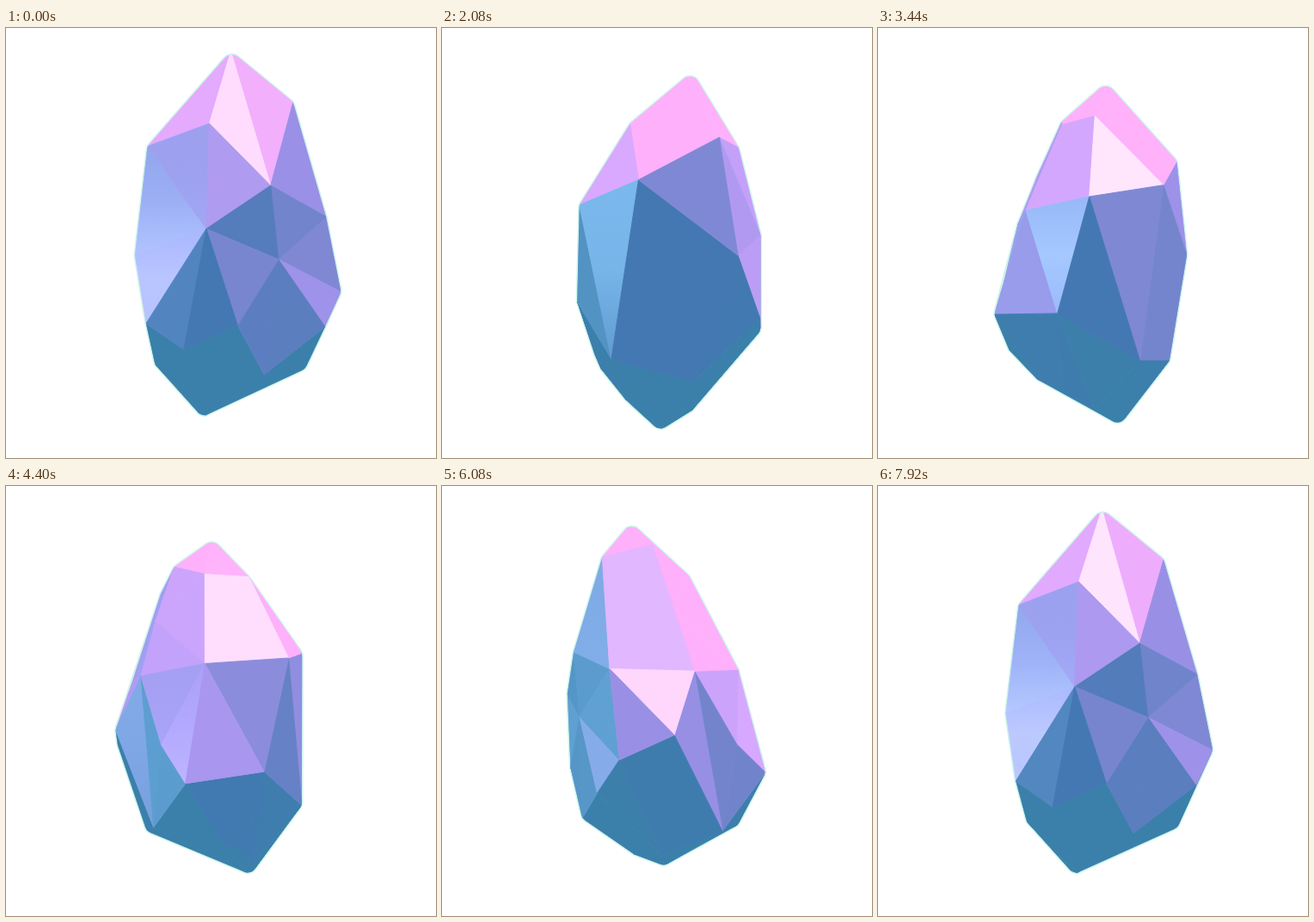
An HTML page with a canvas for the animation above (8 s loop, 500x500 px).

```html
<!DOCTYPE html>
<html lang="en">
<head>
<meta charset="utf-8">
<title>Turning crystal</title>
<style>
  html, body { margin: 0; height: 100%; overflow: hidden; background: #fff; }
  canvas { display: block; width: 100vmin; height: 100vmin; }
</style>
</head>
<body>
<canvas id="stage" width="500" height="500"></canvas>
<script>
const ctx = document.getElementById('stage').getContext('2d');
const CENTER_X = 256, CENTER_Y = 262, CAMERA = 420;
const LOOP = 8000, STEP = 80, DEG_PER_MS = 0.04525;

// Corners as x, y (down), z (towards the viewer)
const corners = {
  A: [5, -215, 36],   B: [-13, -145, -37], C: [33, -146, -26], R: [58, -166, 15],
  e: [66, -149, 64],  a: [-15.5, -120, 86], f: [-81, -110, 48.5], U: [82, -97, -3],
  v: [-84, -68, -28], b: [40, -61, 95],    t: [-32, -51, -90], D: [47, -44, -76],
  P: [99, -36, -20],  j: [101, -37, 55],   c: [-17, -21, 111], p: [-90, 2, 64],
  d: [48, 5.5, 88],   Q: [123, 19.5, 1],   J: [85, 31, -63],   k: [119, 40, 46],
  E: [-3, 55, -97],   G: [70, 61, -97],    g: [-73, 64, 91],   i: [10, 63, 103],
  l: [97, 72, 66],    h: [-37, 84, 104],   r: [-68, 102, -54], K: [90, 111, -48],
  m: [35, 112, 87],   q: [-78, 122, 24],   L: [30, 125, -81],  o: [90, 132, 8],
  M: [6, 135, -71],   O: [-15, 163, -42],  N: [-29, 192, -5],  W: [-22, 174, 32]
};

const faces = (
  'Afa Aab Abe AeR ARC ACB ABvf Bvt BCDt RUC UCD UPD ' +
  'PjeRU bej abc fac fcp fvp pcg vtr vpqr pgq tEr DtE DEG DGJ PDJ ' +
  'bcd bjd cdi djk dkl dim dml jPQ jQk PQK PJK JGK ' +
  'cgh chi ghq kQKo klo GKL GEL LEM EMO ErO ' +
  'hiW imW mWol WNo oKN KLN LMN MON OrN rqN qhW qWN'
).split(' ');

// Tint by how far a facet leans up and to the right
const ramp = [
  [-0.5, [58, 128, 170]], [-0.06, [68, 120, 178]], [0.08, [125, 135, 210]],
  [0.23, [163, 147, 237]], [0.4, [215, 168, 255]], [0.52, [255, 176, 250]]
];

const sub = (p, q) => p.map((value, n) => value - q[n]);
const dot = (p, q) => p[0] * q[0] + p[1] * q[1] + p[2] * q[2];
const cross = (p, q) => [
  p[1] * q[2] - p[2] * q[1], p[2] * q[0] - p[0] * q[2], p[0] * q[1] - p[1] * q[0]
];
const clamp = value => Math.max(0, Math.min(1, value));
const bell = (value, width) => Math.exp(-value * value / width);

function normalOf([p, q, r]) {
  const n = cross(sub(q, p), sub(r, p));
  const outward = p.map((value, k) => value + q[k] + r[k]);
  const size = Math.hypot(...n) * Math.sign(dot(n, outward));
  return n.map(value => value / size);
}

function shade([x, y], height) {
  const up = -y;
  const lean = up + 0.14 * x + 0.2 * bell(x - 0.2, 0.2) * clamp((up - 0.25) * 10);
  let k = 1;
  while (k < ramp.length - 1 && lean > ramp[k][0]) k++;
  const [from, low] = ramp[k - 1], [to, high] = ramp[k];
  const mix = clamp((lean - from) / (to - from));
  const sky = clamp((-x - 0.2) * 2.2) * clamp(1 - Math.abs(up - 0.08) * 3);
  const glint = 38 * bell(x + 0.6, 0.01) * bell(up - 0.1 - 0.0024 * height, 0.03);
  const shine = bell(x - 0.2, 0.02) * bell(up - 0.47, 0.02);
  const rgb = low.map((value, n) => {
    const tint = value + (high[n] - value) * mix;
    const lit = Math.min(255, tint + [34, 48, 40][n] * sky + glint);
    return Math.round(lit + (255 - lit) * shine);
  });
  return `rgb(${rgb})`;
}

function project([x, y, z]) {
  const scale = CAMERA / (CAMERA - z);
  return [CENTER_X + x * scale, CENTER_Y + y * scale];
}

function hull(points) {
  const half = list => {
    const chain = [];
    for (const p of list) {
      while (chain.length > 1) {
        const [q, s] = chain.slice(-2);
        if ((s[0] - q[0]) * (p[1] - q[1]) - (s[1] - q[1]) * (p[0] - q[0]) > 0) break;
        chain.pop();
      }
      chain.push(p);
    }
    return chain.slice(0, -1);
  };
  const sorted = [...points].sort((p, q) => p[0] - q[0] || p[1] - q[1]);
  return [...half(sorted), ...half(sorted.reverse())];
}

function roundedPath(points, radius) {
  const path = new Path2D(), count = points.length;
  const middle = (p, q) => [(p[0] + q[0]) / 2, (p[1] + q[1]) / 2];
  path.moveTo(...middle(points[count - 1], points[0]));
  points.forEach((p, n) => path.arcTo(...p, ...middle(p, points[(n + 1) % count]), radius));
  path.closePath();
  return path;
}

function drawFacet(points, normal) {
  const flat = points.map(project);
  const top = points.reduce((p, q) => p[1] < q[1] ? p : q);
  const bottom = points.reduce((p, q) => p[1] > q[1] ? p : q);
  const paint = ctx.createLinearGradient(0, project(top)[1], 0, project(bottom)[1]);
  for (const stop of [0, 0.5, 1]) {
    paint.addColorStop(stop, shade(normal, top[1] + (bottom[1] - top[1]) * stop));
  }
  ctx.beginPath();
  flat.forEach(p => ctx.lineTo(...p));
  ctx.closePath();
  ctx.fillStyle = ctx.strokeStyle = paint;
  ctx.fill();
  ctx.stroke();
}

function draw(time) {
  const angle = time * DEG_PER_MS * Math.PI / 180;
  const cos = Math.cos(angle), sin = Math.sin(angle);
  const turned = {};
  for (const key in corners) {
    const [x, y, z] = corners[key];
    turned[key] = [x * cos + z * sin, y, z * cos - x * sin];
  }

  ctx.fillStyle = '#fff';
  ctx.fillRect(0, 0, 500, 500);
  const outline = roundedPath(hull(Object.values(turned).map(project)), 11);
  ctx.lineJoin = 'round';
  ctx.lineWidth = 3;
  ctx.strokeStyle = 'rgba(170, 235, 220, 0.6)';
  ctx.stroke(outline);

  ctx.save();
  ctx.clip(outline);
  ctx.lineWidth = 1;
  faces
    .map(keys => {
      const points = [...keys].map(key => turned[key]);
      const depth = points.reduce((sum, p) => sum + p[2], 0) / points.length;
      return { points, depth, normal: normalOf(points) };
    })
    .filter(({ points, normal }) => dot(normal, sub([0, 0, CAMERA], points[0])) > 0)
    .sort((p, q) => p.depth - q.depth)
    .forEach(({ points, normal }) => drawFacet(points, normal));
  ctx.restore();
}

function tick() {
  const time = performance.now() % LOOP;
  draw(Math.floor(time / STEP) * STEP);
  requestAnimationFrame(tick);
}
tick();
</script>
</body>
</html>
```
